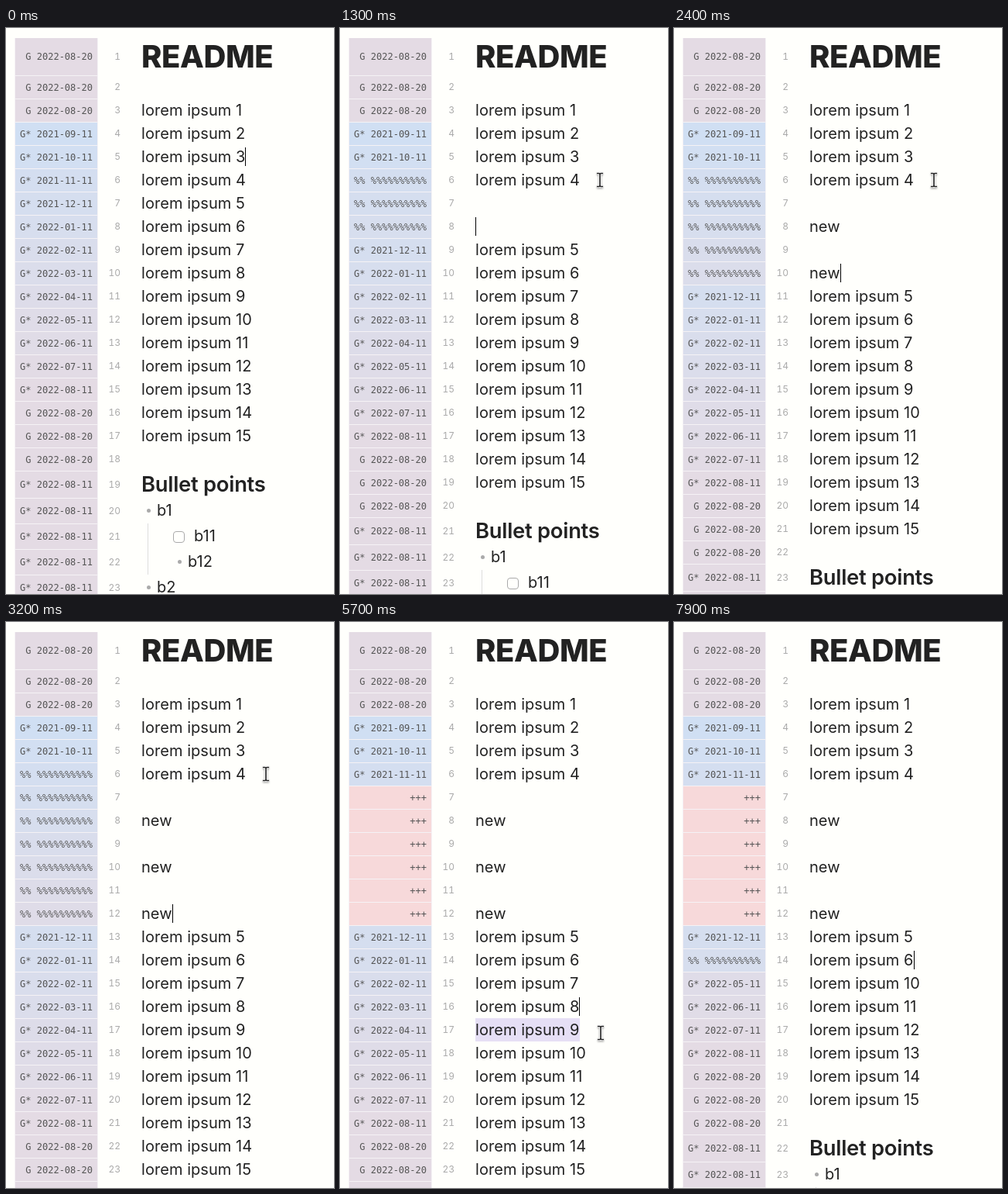
An HTML page that plays this animation: 424 px wide and 730 px high, repeating every 8 s.

```html
<!DOCTYPE html>
<html lang="en">
<head>
<meta charset="utf-8">
<style>
  html, body { margin: 0; width: 100%; height: 100%; overflow: hidden; background: #fffffc; }
  #page { position: relative; width: 424px; height: 730px; overflow: hidden; color: #222;
          font: 20px Inter, sans-serif; letter-spacing: .05px; }
  #gutter { position: absolute; left: 11px; top: 13px; width: 108px; height: 717px; background: #f5f2f5; }
  .row { position: absolute; left: 0; width: 424px; white-space: pre; }
  .row > * { position: absolute; top: 0; height: 100%; }
  .row > .blame { left: 12px; top: 1px; width: 100px; height: calc(100% - 1px); padding-right: 6px;
    display: flex; align-items: center; justify-content: flex-end;
    color: #555; font: 12px "DejaVu Sans Mono", monospace; letter-spacing: 0; }
  .h1 > .blame { top: 0; height: 100%; }
  .num { right: 276px; color: #aaa; font-size: 12px; letter-spacing: 0; font-variant-numeric: tabular-nums; }
  .text { left: 175px; }
  .h1 .text { font-size: 40px; font-weight: 800; letter-spacing: -.01em; }
  .h2 .text { font-size: 27.4px; font-weight: 600; letter-spacing: -.01em; }
  .item .text { left: 195px; }
  .sub .text { left: 235px; }
  .task .text { left: 243px; }
  .sel { background: #e6dff5; }
  .caret { position: absolute; top: 3px; width: 1px; height: 24px; background: #000; }
  .item::before, .sub::before { content: ""; position: absolute; left: 182px; top: 14px;
    width: 5px; height: 5px; border-radius: 50%; background: #aaa; }
  .sub::before { left: 222px; }
  .task::before { content: ""; position: absolute; left: 216px; top: 10px;
    width: 13px; height: 13px; border: 1px solid #aaa; border-radius: 4px; }
  .sub::after, .task::after { content: ""; position: absolute; left: 183px; top: 0;
    width: 1px; height: 100%; background: #ddd; }
  #mouse { position: absolute; left: 0; top: 0; overflow: visible; fill: none; filter: drop-shadow(0 1px 1px #0006); }
</style>
</head>
<body>
<div id="page">
  <div id="gutter"></div>
  <div id="rows"></div>
  <svg id="mouse" width="1" height="1">
    <defs><path id="beam" d="M-4-8.5h3l1 1l1-1h3M0-7.5V7.5M-4 8.5h3l1-1l1 1h3"/></defs>
    <use href="#beam" stroke="#fff" stroke-width="3.5"/>
    <use href="#beam" stroke="#222" stroke-width="1.6"/>
  </svg>
</div>
<script>
const LOOP = 8000, STEP = 100;
const KEY_TIME = 80, BLINK = 600;
const SAVE = 3600, SELECT = 5600, CUT = 6500;
const PENDING = '%% %%%%%%%%%%';
const HEIGHT = { p: 30, h1: 48, h2: 35.4, item: 33, task: 33, sub: 33 };

// Bursts of keys below line 6: start time, text
const BURSTS = [[1200, '\n\n'], [1600, 'new\n'], [2100, '\n'], [2230, 'new'], [2700, '\n\n'], [3000, 'new']];
const keys = BURSTS.flatMap(([start, text]) => [...text].map((char, i) => ({ time: start + i * KEY_TIME, char })));

// Caret stops: time, row, column (end of line if absent)
const moves = [[-400, 5], [800, 6]];
let typedRow = 6;
for (const { time, char } of keys) moves.push([time, char === '\n' ? ++typedRow : typedRow]);
moves.push([4300, 13, 4], [4600, 15, 4], [4800, 16, 4]);
for (let i = 0; i < 4; i++) moves.push([SELECT + i * 100, 17 - i]);
moves.push([CUT, 14]);

// Pointer glides: start, duration, x, y
const GLIDES = [[300, 200, 336, 196], [5000, 200, 338, 394], [5300, 200, 341, 540],
  [5500, 100, 337, 530], [5700, 400, 339, 437], [6700, 200, 442, 388]];

function pointerAt(t) {
  let x = 440, y = 200;
  for (const [start, duration, toX, toY] of GLIDES) {
    const k = Math.min(1, Math.max(0, (t - start) / duration));
    const eased = 1 - (1 - k) ** 2;
    x += (toX - x) * eased;
    y += (toY - y) * eased;
  }
  return [x, y];
}

const ageColor = age => `rgb(${208 + 20 * age}, ${223 - 4 * age}, ${243 - 15 * age})`;
const line = (text, kind = 'p', blame = 'G 2022-08-20', age = 1) => ({ text, kind, blame, color: ageColor(age) });
const old = (text, kind) => line(text, kind, 'G* 2022-08-11');

function lorem(n) {
  const month = n - 2;
  if (month < 0 || month > 11) return line('lorem ipsum ' + n);
  const date = new Date(Date.UTC(2021, 8 + month, 11)).toISOString().slice(0, 10);
  return line('lorem ipsum ' + n, 'p', 'G* ' + date, month / 11);
}

function linesAt(t) {
  const lines = [line('README', 'h1'), line(''), ...Array.from({ length: 15 }, (_, i) => lorem(i + 1)),
    line(''), old('Bullet points', 'h2'), old('b1', 'item'), old('b11', 'task'), old('b12', 'sub'), old('b2', 'item')];
  const typed = keys.filter(key => key.time <= t).map(key => key.char).join('');
  const added = typed.split('\n').slice(1).map((text, i) => t < SAVE
    ? { text, kind: 'p', blame: PENDING, color: lines[6 + i].color }
    : { text, kind: 'p', blame: '+++', color: '#f7d9da' });
  lines.splice(6, 0, ...added);
  if (added.length && t < SAVE) lines[5].blame = PENDING;
  if (t >= CUT) {
    lines.splice(14, 3);
    lines[13].blame = PENDING;
  }
  return lines;
}

function pageHtml(t) {
  const [moved, caretRow, column] = moves.findLast(move => move[0] <= t);
  const caretOn = Math.floor((t - moved) / BLINK) % 2 === 0;
  const selecting = t >= SELECT && t < CUT;
  let top = 13;
  return linesAt(t).map(({ text, kind, blame, color }, i) => {
    const row = i + 1, y = top, h = HEIGHT[kind];
    top += h;
    const split = column ?? text.length;
    const body = caretOn && row === caretRow
      ? text.slice(0, split) + '<i class="caret"></i>' + text.slice(split) : text;
    const selected = selecting && row > caretRow && row <= 17 ? ' sel' : '';
    return `<div class="row ${kind}" style="top:${y}px;height:${h}px;line-height:${h}px">`
      + `<span class="blame" style="background:${color}">${blame}</span>`
      + `<span class="num">${row}</span><span class="text${selected}">${body}</span></div>`;
  }).join('');
}

const rows = document.getElementById('rows'), mouse = document.getElementById('mouse');
let shown = -1;
function draw(now) {
  const t = Math.floor(now % LOOP / STEP) * STEP;
  if (t !== shown) {
    shown = t;
    rows.innerHTML = pageHtml(t);
    const [x, y] = pointerAt(t);
    mouse.style.transform = `translate(${x}px, ${y}px)`;
  }
  requestAnimationFrame(draw);
}
draw(performance.now());
</script>
</body>
</html>
```
